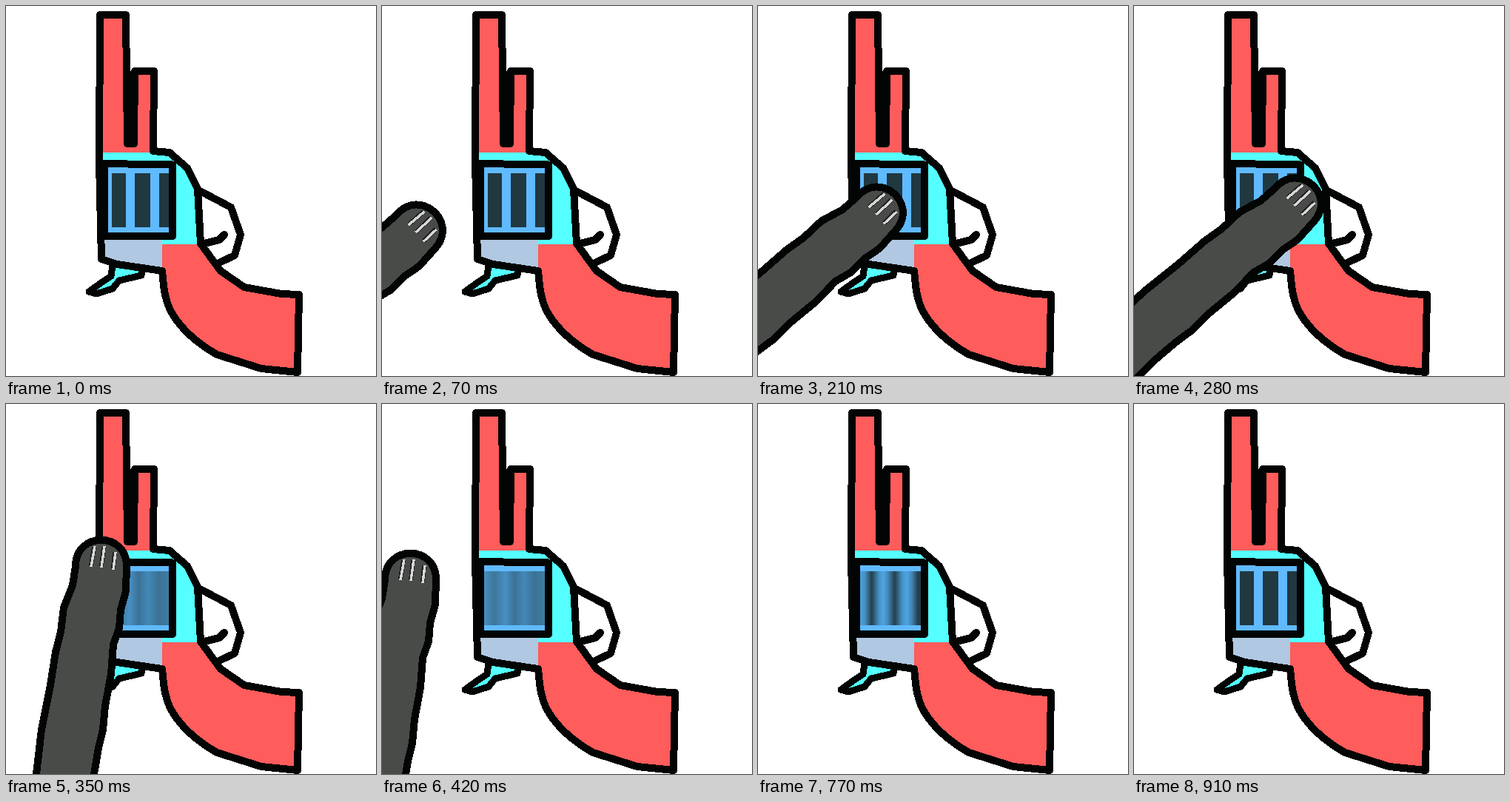
These frames come from a looping animation (500x500 px, 980 ms). An HTML page:

```html
<!DOCTYPE html>
<html>
<head>
<meta charset="utf-8">
<style>
  html, body { margin: 0; width: 100%; height: 100%; overflow: hidden; background: #fff; }
  svg { display: block; width: 100vw; height: 100vh; shape-rendering: crispEdges; }
  .ink { stroke: #030504; stroke-width: 10; stroke-linejoin: round; stroke-linecap: round; }
</style>
</head>
<body>
<svg viewBox="0 0 500 500">
  <defs>
    <linearGradient id="fast">
      <stop offset="0" stop-color="#478fc0"/>
      <stop offset=".17" stop-color="#3d7699"/>
      <stop offset=".35" stop-color="#4790c2"/>
      <stop offset=".5" stop-color="#3b7296"/>
      <stop offset=".66" stop-color="#4488b6"/>
      <stop offset=".83" stop-color="#3b7295"/>
      <stop offset="1" stop-color="#3f7ba2"/>
    </linearGradient>
    <linearGradient id="slow">
      <stop offset="0" stop-color="#4b9fdb"/>
      <stop offset=".08" stop-color="#4590c4"/>
      <stop offset=".19" stop-color="#253f4c"/>
      <stop offset=".31" stop-color="#4590c4"/>
      <stop offset=".38" stop-color="#4ea5e2"/>
      <stop offset=".46" stop-color="#4287b6"/>
      <stop offset=".57" stop-color="#253f4c"/>
      <stop offset=".69" stop-color="#4590c4"/>
      <stop offset=".77" stop-color="#4ea5e2"/>
      <stop offset=".85" stop-color="#4287b6"/>
      <stop offset=".95" stop-color="#253f4c"/>
      <stop offset="1" stop-color="#253f4c"/>
    </linearGradient>
    <path id="body" d="M127 12H162L164 186 173 186 174 88H200L199 196 221 198 245 219 259 247 263 321 290 358 322 380 372 389 396 390 394 495 345 490 285 471Q245 448 226 418 216 403 213 378L211 358 150 349 129 342 126 210Z"/>
    <clipPath id="inside"><use href="#body"/></clipPath>
  </defs>

  <g class="ink" fill="none">
    <path d="M264 251 304 272 317 309 309 337 288 347"/>
    <path d="M264 322 288 316 295 309"/>
    <path fill="#55ffff" stroke-width="9" d="M144 350 142 365 130 373 112 386 122 389 144 382 153 371 183 364 183 354"/>
  </g>

  <g clip-path="url(#inside)">
    <path fill="#ff5c5c" d="M0 0H500V500H0Z"/>
    <path fill="#55ffff" d="M120 198H270V322H120Z"/>
    <path fill="#b0c8e1" d="M120 311H211V365H120Z"/>
  </g>
  <path fill="#030504" d="M163 88H175V188H163Z"/>
  <use href="#body" class="ink" fill="none"/>

  <path class="ink" fill="#60baff" d="M133 213 225 214.500V311H133Z"/>
  <path id="bars" fill="#203840" d="M143 226H162V299H143ZM174 226H195V299H174ZM207 226H220V299H207Z"/>
  <rect id="blur" x="138" y="226" width="82" height="73"/>

  <g id="arm">
    <path class="ink" fill="#494b49" d="M94 219C94 172 163 172 163 219L162 253 155 278 153 303 145 325 142 365 134 408 131 440 125 465 119 500 105 640H18L41 500 48 440 60 380 67 335 74 308 78 275 90 245Z"/>
    <g fill="none">
      <path stroke="#222" stroke-width="6" d="M115 219 119 193M129 220 132 193M145 223 147 200"/>
      <path stroke="#d6d6d6" stroke-width="3.500" d="M115 220 120 192M129 221 133 192M145 224 148 200"/>
    </g>
  </g>
</svg>
<script>
  const LOOP = 980, STEP = 70;
  const [bars, blur, arm] = ["bars", "blur", "arm"].map(id => document.getElementById(id));
  const show = (el, on) => el.setAttribute("visibility", on ? "visible" : "hidden");

  // The hand reaches in over steps 1-4, flicks the cylinder on 5 and leaves on 6.
  function armPose(step) {
    if (step < 5) return { x: -139 + 57 * step, y: 97 - 12 * step, angle: 40 };
    return { x: -90 * (step - 5), y: 18 * (step - 5), angle: 0 };
  }

  function draw(now) {
    const step = Math.floor(now % LOOP / STEP);
    const spinning = step >= 5 && step < 13;
    show(bars, !spinning);
    show(blur, spinning);
    blur.setAttribute("fill", step < 11 ? "url(#fast)" : "url(#slow)");

    show(arm, step >= 1 && step <= 6);
    const { x, y, angle } = armPose(step);
    arm.setAttribute("transform", `translate(${x} ${y}) rotate(${angle} 128.5 219)`);
    requestAnimationFrame(draw);
  }
  draw(performance.now());
</script>
</body>
</html>
```
